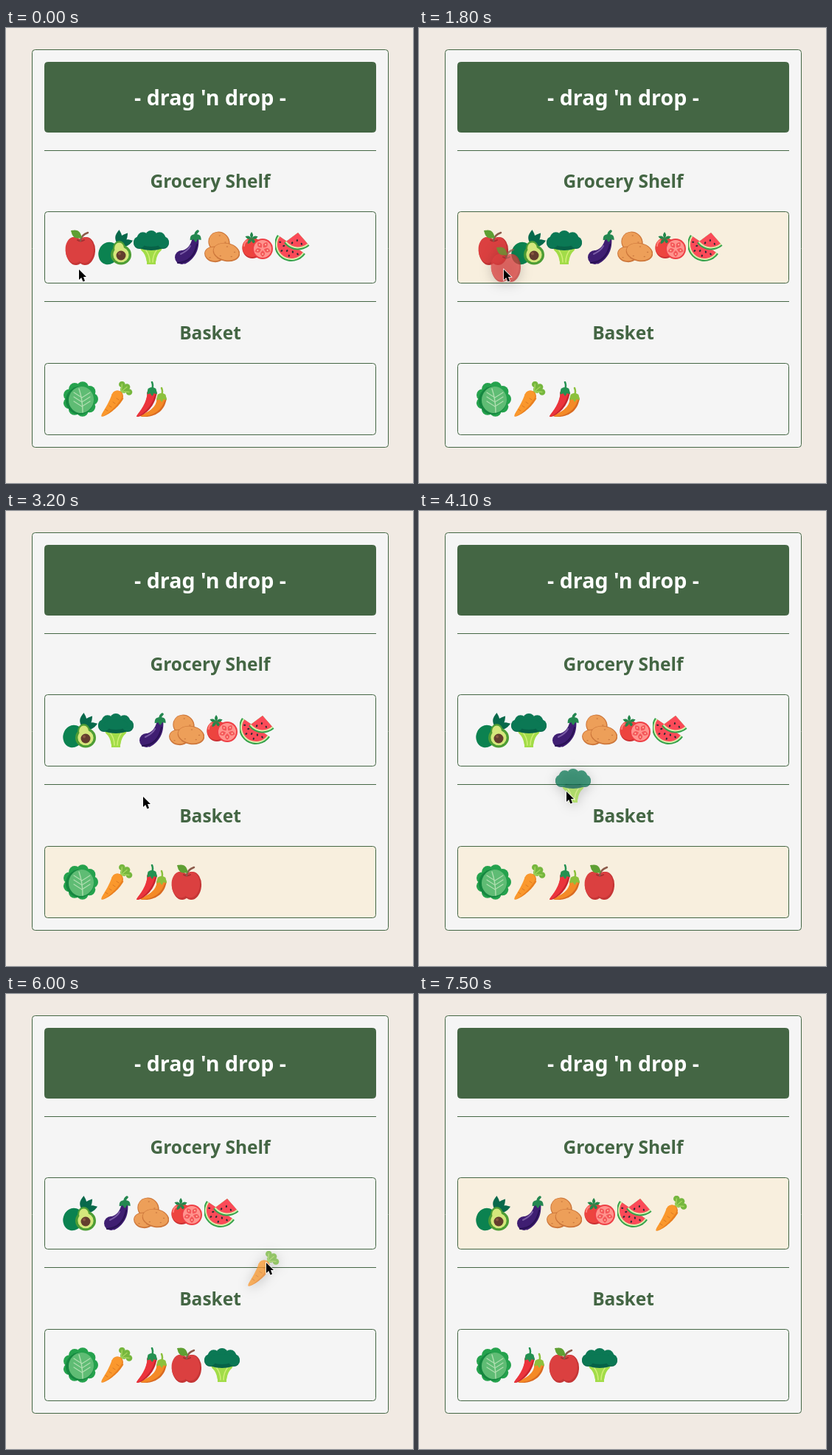
Recreate the animation shown at these times as an HTML page with a canvas. Size 552 px wide and 618 px high, loop 7600 ms.

```html
<!DOCTYPE html>
<html lang="en">
<head>
<meta charset="utf-8">
<title>drag 'n drop</title>
<style>
html, body { margin: 0; width: 100%; height: 100%; overflow: hidden; background: #f1eae3; }
canvas { display: block; }
</style>
</head>
<body>
<canvas id="stage" width="552" height="618"></canvas>
<script>
const ctx = document.getElementById('stage').getContext('2d');
const LOOP = 7600, STEP = 100, CELL = 48, LEFT = 77;
const GREEN = '#446644', PAPER = '#f5f5f5', CREAM = '#f8efde';
const { PI, cos, sin, sqrt } = Math;
let pen = ctx;

// --- drawing helpers ---
function fill(color, ...paths) {
  pen.fillStyle = color;
  for (const p of paths) pen.fill(p);
}

function oval(x, y, rx, ry = rx, turn = 0) {
  const p = new Path2D();
  p.ellipse(x, y, rx, ry, turn, 0, 2 * PI);
  return p;
}

function slice(x, y, r, a, b) {
  const p = new Path2D();
  p.moveTo(x, y);
  p.arc(x, y, r, a, b);
  p.closePath();
  return p;
}

const bezier = (a, b, c, u) => a.map((v, i) =>
  (1 - u) * (1 - u) * v + 2 * u * (1 - u) * b[i] + u * u * c[i]);

// A bent shape from a to c whose half width is a function of 0..1.
function tube(a, b, c, width) {
  const p = new Path2D(), n = 24, edge = [];
  for (let i = 0; i <= n; i++) {
    const u = i / n, [x, y] = bezier(a, b, c, u), w = width(u);
    const dx = (1 - u) * (b[0] - a[0]) + u * (c[0] - b[0]);
    const dy = (1 - u) * (b[1] - a[1]) + u * (c[1] - b[1]);
    const len = Math.hypot(dx, dy) || 1;
    p.lineTo(x - dy / len * w, y + dx / len * w);
    edge.unshift([x + dy / len * w, y - dx / len * w]);
  }
  edge.forEach((e) => p.lineTo(...e));
  p.closePath();
  return p;
}

const taper = (w) => (u) => w * sqrt(1 - u);

function leaf(x, y, angle, len, w) {
  const at = (d) => [x + cos(angle) * d, y + sin(angle) * d];
  return tube(at(0), at(len / 2), at(len), (u) => w * sin(PI * u));
}

function line(color, width, a, b, c) {
  pen.strokeStyle = color;
  pen.lineWidth = width;
  pen.lineCap = 'round';
  pen.beginPath();
  pen.moveTo(...a);
  pen.quadraticCurveTo(...b, ...c);
  pen.stroke();
}

function times(n, make) {
  return Array.from({ length: n }, (_, i) => make(i));
}

// --- groceries, each in a 48 px cell ---
const ICONS = {
  apple() {
    const lobes = (d, s) => [-1, 1].map((k) =>
      oval(24 - d + k * 7, 29 - d, 13 * s, 19 * s, k * .08));
    fill('#c53636', ...lobes(0, 1));
    fill('#db4040', ...lobes(1.3, .93));
    line('#a52f30', 2, [20, 14], [24, 17], [29, 14]);
    line('#8c5a4a', 2.5, [24, 15], [25, 7], [34, 4]);
    fill('#5f9f33', leaf(11, 1, .6, 18, 5));
  },
  avocado() {
    fill('#08694b', ...times(3, (i) => leaf(27, 21, -1.5 + i * .6, 21, 4.5)));
    fill('#0b8250', oval(14, 32, 13.5, 15.5, .3));
    const pear = (s) => [oval(31, 34, 14 * s, 13.5 * s), oval(28.5, 25, 8.5 * s, 10 * s)];
    fill('#4d9d35', ...pear(1));
    fill('#d5e77c', ...pear(.76));
    fill('#633d2e', oval(31, 35, 6.5));
    fill('#89583f', oval(29, 32.5, 2));
  },
  broccoli() {
    fill('#a2dc48', tube([24, 47], [24, 38], [24, 22], () => 6));
    for (const k of [-1, 1]) {
      line('#a2dc48', 5, [24 + k * 4, 42], [24 + k * 5, 32], [24 + k * 12, 26]);
      line('#d2ef77', 1.5, [24 + k * 2, 44], [24 + k * 2, 34], [24 + k * 8, 27]);
    }
    const bump = (r, y) => times(5, (i) => {
      const a = PI + i * PI / 4;
      return oval(24 + 16 * cos(a), y + 8 * sin(a), r);
    });
    fill('#076247', ...bump(8, 18), oval(24, 21, 19, 7));
    fill('#0b7854', ...bump(8, 17), oval(24, 16, 16, 7));
  },
  eggplant() {
    fill('#3f1e72', tube([36, 9], [36, 31], [18, 38], (u) => 4 + 5.5 * u), oval(17.5, 37.5, 9.5));
    line('#291154', 2, [12, 45], [33, 44], [38, 20]);
    line('#785ba4', 2, [29, 22], [26, 28], [16, 33]);
    fill('#248750', ...times(3, (i) => leaf(36, 6, .8 + i * .75, 11, 3)));
    line('#248750', 3.5, [36, 8], [36, 4], [39, 2]);
  },
  potato() {
    const spud = (x, y, rx, ry, turn) => {
      fill('#cd773b', oval(x, y, rx, ry, turn));
      fill('#ed9f59', oval(x - .3, y - .5, rx - 1.3, ry - 1.3, turn));
      for (let i = 0; i < 4; i++) {
        fill('#ca7a40', oval(x + rx * .6 * cos(i * 2.4), y + ry * .6 * sin(i * 2.4), 1.2, .7));
      }
    };
    spud(20, 17, 14, 15, -.9);
    spud(13.5, 33.5, 13.5, 10.5, .2);
    spud(30, 30.5, 18.5, 12.5, .2);
  },
  tomato() {
    fill('#ca3033', oval(17, 25, 13.5, 14));
    fill('#ed443f', oval(16.5, 24, 13, 13));
    line('#ff807b', 2, [6, 22], [6, 17], [10, 15]);
    fill('#23874b', ...times(5, (i) => leaf(16, 12, i * 2 * PI / 5 - .3, 9, 2)));
    fill('#ee3f45', oval(31, 26, 14));
    fill('#ff948e', oval(31, 26, 12));
    for (let i = 0; i < 5; i++) {
      const a = i * 2 * PI / 5 + .3;
      fill('#f4585a', leaf(31 + 2 * cos(a), 26 + 2 * sin(a), a, 9, 3));
      fill('#ffc3a8', oval(31 + 7 * cos(a), 26 + 7 * sin(a), 1));
    }
  },
  melon() {
    const wedge = (x, y, r, a, b, seeds) => {
      ['#35a34c', '#dcecaa', '#fb4a58'].forEach((color, i) =>
        fill(color, slice(x, y, r - 2 * i, a, b)));
      for (let i = 1; i <= seeds; i++) {
        const s = a + (b - a) * i / (seeds + 1), d = r * (i % 2 ? .68 : .45);
        fill('#2c2d32', oval(x + d * cos(s), y + d * sin(s), 1.6, 1.1, s));
      }
    };
    wedge(22, 20, 23, .6, .6 + PI, 7);
    wedge(31, 4, 23.5, .85, 2.5, 3);
  },
  cabbage() {
    const ruffle = (x, y, s) => times(9, (i) =>
      oval(x + 16 * s * cos(i * .7), y + 16 * s * sin(i * .7), 8 * s));
    fill('#25a24d', oval(24, 24, 20), ...ruffle(24, 24, 1));
    fill('#158740', oval(23, 26, 19, 19, .2));
    fill('#5fbc74', oval(25, 25, 17, 18, .2));
    line('#afdeb0', 1.4, [22, 10], [27, 25], [27, 42]);
    for (let i = 0; i < 3; i++) {
      const y = 22 + 6 * i;
      for (const k of [-1, 1]) line('#afdeb0', 1.2, [26, y], [26 + k * 5, y - 3], [26 + k * 11, y - 7]);
    }
  },
  carrot() {
    const tips = times(3, (i) => [31 + 11 * cos(.7 * i - 1.45), 15 + 11 * sin(.7 * i - 1.45)]);
    fill('#76b73e', oval(35, 11, 5), ...tips.map(([x, y]) => oval(x, y, 4.3)));
    tips.forEach((tip) => line('#a4d45d', 1.5, [29, 18], [32, 13], tip));
    fill('#e98020', tube([27, 20], [22, 33], [4.5, 47.5], taper(8)), oval(26.5, 20, 7.5));
    fill('#fa982d', tube([25, 20], [19, 33], [4.5, 47.5], taper(7)), oval(25.5, 19.5, 7));
    for (let i = 0; i < 4; i++) {
      const x = 25 - 5 * i, y = 23 + 5 * i;
      line('#d97622', 1, [x, y], [x + 1, y + 1], [x + 3, y + 2]);
    }
  },
  chili() {
    const pod = (x, y, tip, color, shade, cap) => {
      line(cap, 2.5, [x, y - 4], [x + 2, y - 8], [x, y - 13]);
      fill(shade, tube([x, y + 2], [x - 2, y + 22], tip, taper(6.5)), oval(x, y + 2, 6.5));
      fill(color, tube([x - 1, y + 2], [x - 4, y + 20], tip, taper(5.3)), oval(x - .7, y + 1.5, 5.8));
      fill(cap, oval(x, y - 2, 6, 4), ...times(3, (i) => leaf(x, y - 4, .8 + i * .75, 10, 2.5)));
    };
    pod(38, 22, [9, 47], '#f48a27', '#d96b22', '#8cc13d');
    pod(25, 14, [4, 48], '#eb343c', '#c9252f', '#249151');
  }
};

const sprites = {};
for (const name in ICONS) {
  const sheet = sprites[name] = document.createElement('canvas');
  sheet.width = sheet.height = CELL;
  pen = sheet.getContext('2d');
  ICONS[name]();
}
pen = ctx;

function drawArrow() {
  const p = new Path2D('M0 0V14L3.200 11L5.500 16.500L8 15.500L6 10H10Z');
  ctx.strokeStyle = '#ffffff';
  ctx.lineWidth = 1.5;
  ctx.stroke(p);
  fill('#000000', p);
}

function drawHand() {
  const p = new Path2D();
  for (let i = 0; i < 4; i++) p.roundRect(3 * i - 2, i ? 4.5 + i * .5 : 0, 3, 9, 1.5);
  p.roundRect(-1.5, 8, 11, 8, 2);
  p.ellipse(-3, 9, 1.8, 3.5, -.7, 0, 2 * PI);
  ctx.strokeStyle = '#000000';
  ctx.lineWidth = 2;
  ctx.stroke(p);
  fill('#ffffff', p);
  for (let i = 0; i < 3; i++) line('#000000', .8, [1.5 + 2.5 * i, 10], [1.5 + 2.5 * i, 11], [1.5 + 2.5 * i, 13]);
}

// --- story: the pointer leaves, grips an item at start and drops it at the place "to" ---
const DRAGS = [
  { item: 'apple', leave: 600, start: 1700, drop: 2500, grip: [21, 31], to: [261, 525] },
  { item: 'broccoli', leave: 2500, start: 3900, drop: 4600, grip: [15, 32], to: [311, 518] },
  { item: 'carrot', leave: 4800, start: 5700, drop: 6600, grip: [29, 16], to: [367, 301], via: [394, 388] }
];
const ZONES = [
  { y: 249, items: ['apple', 'avocado', 'broccoli', 'eggplant', 'potato', 'tomato', 'melon'] },
  { y: 455, items: ['cabbage', 'carrot', 'chili'] }
];
const HOME = [99, 328], EXIT = [56, 547], CARRY = 500, POINTER_END = 7100;

const dragAt = (t) => DRAGS.find((d) => t >= d.start && t < d.drop);

function contentsAt(t) {
  const lists = ZONES.map((z) => z.items.slice());
  for (const { item, drop } of DRAGS) {
    if (t < drop) break;
    const from = lists[0].includes(item) ? 0 : 1;
    lists[from].splice(lists[from].indexOf(item), 1);
    lists[1 - from].push(item);
  }
  return lists;
}

const glides = [];
function glide(begin, end, to, via) {
  const from = glides.length ? glides[glides.length - 1].to : HOME;
  glides.push({ begin, end, from, to, via: via || from.map((v, i) => (v + to[i]) / 2) });
}
for (const d of DRAGS) {
  const lists = contentsAt(d.start), zone = lists[0].includes(d.item) ? 0 : 1;
  const x = LEFT + lists[zone].indexOf(d.item) * CELL, y = ZONES[zone].y + 25;
  glide(d.leave, d.start - 200, [x + d.grip[0], y + d.grip[1]]);
  glide(d.start, d.start + CARRY, d.to, d.via);
}
glide(6600, 7000, EXIT);

function pointerAt(t) {
  let spot = HOME;
  for (const g of glides) {
    if (t < g.begin) break;
    const u = Math.min(1, (t - g.begin) / (g.end - g.begin));
    spot = bezier(g.from, g.via, g.to, u * u * (3 - 2 * u));
  }
  return spot.map(Math.round);
}

// A zone lights up while something is dragged over it and stays lit after a drop.
function litAt(t) {
  const lit = [false, false], over = [false, false];
  for (let s = 0; s <= t; s += STEP) {
    const py = pointerAt(s)[1];
    ZONES.forEach(({ y }, i) => {
      const inside = !!dragAt(s) && py >= y && py < y + 98;
      if (inside) lit[i] = true;
      else if (over[i] && dragAt(s)) lit[i] = false;
      over[i] = inside;
    });
  }
  return lit;
}

// --- scene ---
function box(x, y, w, h, color) {
  ctx.beginPath();
  ctx.roundRect(x + .5, y + .5, w - 1, h - 1, 4);
  ctx.fillStyle = color;
  ctx.fill();
  ctx.strokeStyle = GREEN;
  ctx.lineWidth = 1;
  ctx.stroke();
}

function label(text, y, size, color) {
  ctx.font = `bold ${size}px "Noto Sans", "Open Sans", sans-serif`;
  ctx.textAlign = 'center';
  ctx.fillStyle = color;
  ctx.fillText(text, 277, y);
}

function drawGhost(name, x, y) {
  ctx.save();
  ctx.globalAlpha = .75;
  ctx.shadowColor = 'rgba(0, 0, 0, .25)';
  ctx.shadowBlur = 16;
  ctx.shadowOffsetY = 3;
  ctx.drawImage(sprites[name], x, y);
  ctx.restore();
}

function draw(t) {
  ctx.fillStyle = '#f1eae3';
  ctx.fillRect(0, 0, 552, 618);
  box(35, 29, 484, 541, PAPER);
  box(52, 46, 450, 96, GREEN);
  ctx.fillStyle = GREEN;
  for (const y of [166, 371]) ctx.fillRect(52, y, 450, 1);
  label("- drag 'n drop -", 105, 28.6, '#ffffff');
  label('Grocery Shelf', 217, 24.5, GREEN);
  label('Basket', 423, 24.5, GREEN);

  const [px, py] = pointerAt(t), lit = litAt(t), drag = dragAt(t);
  let hover = false;
  contentsAt(t).forEach((items, i) => {
    const { y } = ZONES[i], top = y + 25;
    box(52, y, 450, 98, lit[i] ? CREAM : PAPER);
    items.forEach((name, n) => ctx.drawImage(sprites[name], LEFT + n * CELL, top));
    hover = hover || (px >= LEFT && px < LEFT + items.length * CELL && py >= top && py < top + CELL);
  });

  if (drag) drawGhost(drag.item, px - drag.grip[0], py - drag.grip[1]);
  if (t < POINTER_END) {
    ctx.save();
    ctx.translate(px, py);
    if (hover && !drag) drawHand();
    else drawArrow();
    ctx.restore();
  }
}

const begin = performance.now();
function tick() {
  const t = (performance.now() - begin) % LOOP;
  draw(Math.floor(t / STEP) * STEP);
  requestAnimationFrame(tick);
}
tick();
</script>
</body>
</html>
```
